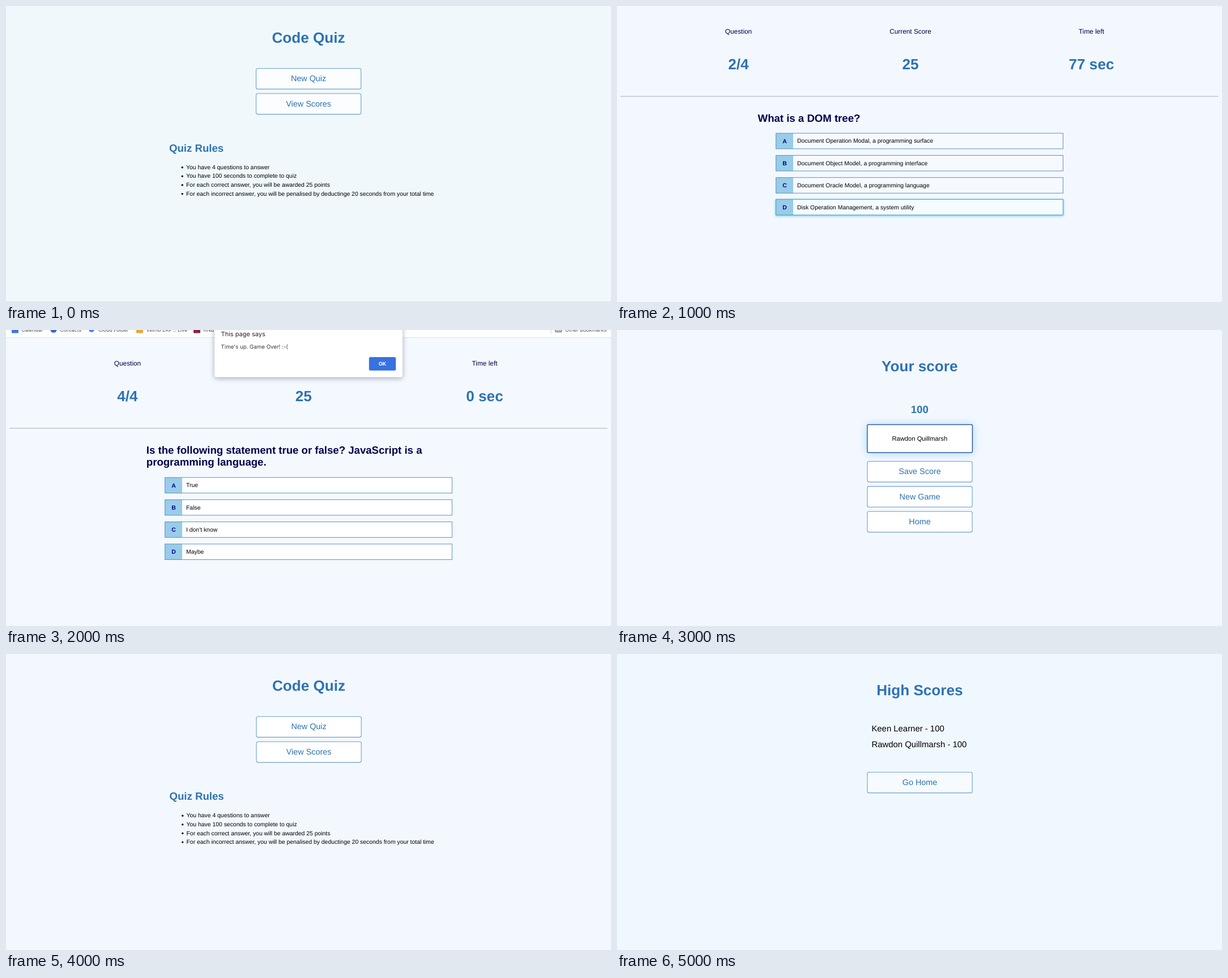
Animation, 1068 px wide and 524 px high, one loop 6 s. Source, as an HTML page:

```html
<!DOCTYPE html>
<html lang="en">
<head>
<meta charset="utf-8">
<title>Code Quiz</title>
<style>
  html, body { margin: 0; width: 100%; height: 100%; overflow: hidden; background: #f3f8ff; }
  svg { display: block; width: 100%; height: 100%; }
  text { font-family: "Liberation Sans", Arial, sans-serif; text-rendering: geometricPrecision; white-space: pre; }
  .ui { font-family: Inter, Roboto, sans-serif; }
  .bold { font-weight: 700; }
  .mid { text-anchor: middle; }
  .hover { filter: drop-shadow(0 1px 2px #4cc4f2); }
  .focus { filter: drop-shadow(0 1px 8px #a9dcf5); }
  .dialog { filter: drop-shadow(0 2px 5px rgba(40, 50, 70, .4)); }
</style>
</head>
<body>
<svg id="stage" viewBox="0 0 1068 524" preserveAspectRatio="none"></svg>
<script>
const BLUE = '#2d72b2', NAVY = '#00004a', MID = 534.3;
const TITLE = 26.1, HEAD = 18.6, BUTTON = 14.4, LABEL = 11.85, BODY = 10.42;

const attrs = o => Object.entries(o).map(([k, v]) => `${k}="${v}"`).join(' ');
const rect = (x, y, width, height, fill, more = {}) =>
  `<rect ${attrs({ x, y, width, height, fill, ...more })}/>`;
const text = (s, x, y, size, fill = '#000', cls = '') =>
  `<text ${attrs({ x, y, 'font-size': size, fill, class: cls })}>${s}</text>`;
const page = (bg, ...parts) => rect(0, 0, 1068, 524, bg) + parts.join('');
const title = (s, y, x = MID) => text(s, x, y, TITLE, BLUE, 'bold mid');

function button(label, y, x = 441.9, fill = '#fff') {
  return rect(x, y, 185.2, 36.6, fill, { rx: 3, stroke: '#6a9fcc', 'stroke-width': 1.1 }) +
    text(label, x + 92.6, y + 22.6, BUTTON, BLUE, 'mid');
}

function home(bg, dx, dy, fill) {
  const rules = [
    'You have 4 questions to answer',
    'You have 100 seconds to complete to quiz',
    'For each correct answer, you will be awarded 25 points',
    'For each incorrect answer, you will be penalised by deductinge 20 seconds from your total time'
  ];
  const list = rules.map((s, i) => {
    const y = 288.8 + dy + i * 15.6;
    return `<circle cx="${311.2 + dx}" cy="${y - 3}" r="1.7"/>` + text(s, 318 + dx, y, BODY);
  });
  return page(bg,
    title('Code Quiz', 64.8 + dy / 2, 534 + dx),
    button('New Quiz', 110.5 + dy / 2, 441.5 + dx, fill),
    button('View Scores', 155 + dy / 2, 441.5 + dx, fill),
    text('Quiz Rules', 288 + dx, 257.6 + dy, HEAD, BLUE, 'bold'),
    ...list);
}

function stats(y, items) {
  return items.map(([label, value, x]) =>
    text(label, x, y, LABEL, NAVY, 'mid') + title(value, y + 62.8, x)).join('') +
    rect(6, y + 110.2, 1055.5, 1.2, '#b1b9c2');
}

function options(top, labels, fill, hovered) {
  return labels.map((s, i) => {
    const on = i === hovered, y = top + i * 39.25 - (on ? .6 : 0);
    return `<g class="${on ? 'hover' : ''}">` +
      rect(280.6, y, 506.8, 27.6, on ? '#f5fcff' : fill) +
      rect(280.6, y, 30.4, 27.6, '#98cce9') +
      rect(280.6, y, 506.8, 27.6, 'none', { stroke: '#5792c3' }) + '</g>' +
      text('ABCD'[i], 296, y + 17.4, BODY, '#00008b', 'bold mid') +
      text(s, 318, y + 17.2, BODY);
  }).join('');
}

function bookmarks() {
  const mark = (s, x) => text(s, x, 3.1, 8.9, '#45484c', 'ui');
  const dot = (x, r, fill) => `<circle cx="${x}" cy="-.8" r="${r}" fill="${fill}"/>`;
  const box = (x, fill) => rect(x, -6, 12, 11.5, fill, { rx: 1 });
  return rect(0, 0, 1068, 13, '#fff') + rect(0, 13, 1068, 1, '#dfe3e8') +
    box(10, '#3c78dc') + mark('Calendar', 27.5) +
    dot(84, 5.6, '#3568d4') + mark('Contacts', 95.5) +
    dot(151, 4.8, '#4285f4') + mark('Cloud Folder', 163) +
    box(230, '#e5a83c') + mark('Velmo ERP :: Live', 247.5) +
    box(331, '#8c2340') + mark('KNB', 348.5) +
    rect(961.5, 0, 1, 6, '#c9ccd1') +
    rect(969.5, -5, 11.5, 8.6, '#b9bcc0', { rx: 1, stroke: '#6b6f74' }) +
    mark('Other Bookmarks', 987);
}

function dialog() {
  return rect(368, -20, 332, 103.4, '#fff', { rx: 4, class: 'dialog' }) +
    text('This page says', 379.6, 10.8, 11, '#222428', 'ui') +
    text("Time's up. Game Over! :-(", 379.6, 32.6, 9.7, '#333639', 'ui') +
    rect(640.8, 48, 47.4, 23.8, '#3871e0', { rx: 2.5 }) +
    text('OK', 664.4, 63.2, 9, '#fff', 'ui bold mid');
}

const scenes = [
  home('#f0f8fc', 0, 0, '#fbfdff') + rect(0, 523, 1068, 1, '#d9e1e5'),

  page('#f3f8ff',
    stats(49.2, [['Question', '2/4', 214.5], ['Current Score', '25', 518], ['Time left', '77 sec', 837.5]]),
    text('What is a DOM tree?', 248.6, 204.6, HEAD, NAVY, 'bold'),
    options(225.2, [
      'Document Operation Modal, a programming surface',
      'Document Object Model, a programming interface',
      'Document Oracle Model, a programming language',
      'Disk Operation Management, a system utility'
    ], '#f6faff', 3)),

  page('#f4f9ff',
    stats(63.2, [['Question', '4/4', 214.5], ['Current Score', '25', 525.3], ['Time left', '0 sec', 845]]),
    text('Is the following statement true or false? JavaScript is a', 247.8, 218.7, HEAD, NAVY, 'bold'),
    text('programming language.', 247.8, 240.2, HEAD, NAVY, 'bold'),
    options(261.1, ['True', 'False', "I don't know", 'Maybe'], '#fff'),
    bookmarks(), dialog()),

  page('#f3f8ff',
    title('Your score', 73.3),
    text('100', MID, 147.4, HEAD, BLUE, 'bold mid'),
    rect(441.8, 167.4, 185.6, 49.6, '#fff', { rx: 2, stroke: '#3059b2', 'stroke-width': 1.5, class: 'focus' }),
    text('Rawdon Quillmarsh', MID, 196, 11.2, '#000', 'mid'),
    button('Save Score', 232.5), button('New Game', 276.9), button('Home', 321.3)),

  home('#f3f8ff', .5, .5, '#fff'),

  page('#f0f8ff',
    title('High Scores', 73),
    text('Keen Learner - 100', 449.4, 137, 14.9),
    text('Rawdon Quillmarsh - 100', 449.4, 165, 14.9),
    button('Go Home', 209.3, 441.9, '#f7fbff'))
];

const stage = document.getElementById('stage');
stage.innerHTML = scenes.map(s => `<g display="none">${s}</g>`).join('');
const groups = [...stage.children];
const start = performance.now();
let shown = -1;

function draw(now) {
  const i = Math.floor(Math.max(0, now - start) / 1000) % groups.length;
  if (i !== shown) {
    groups.forEach((g, k) => g.setAttribute('display', k === i ? 'inline' : 'none'));
    shown = i;
  }
  requestAnimationFrame(draw);
}
draw(start);
</script>
</body>
</html>
```
